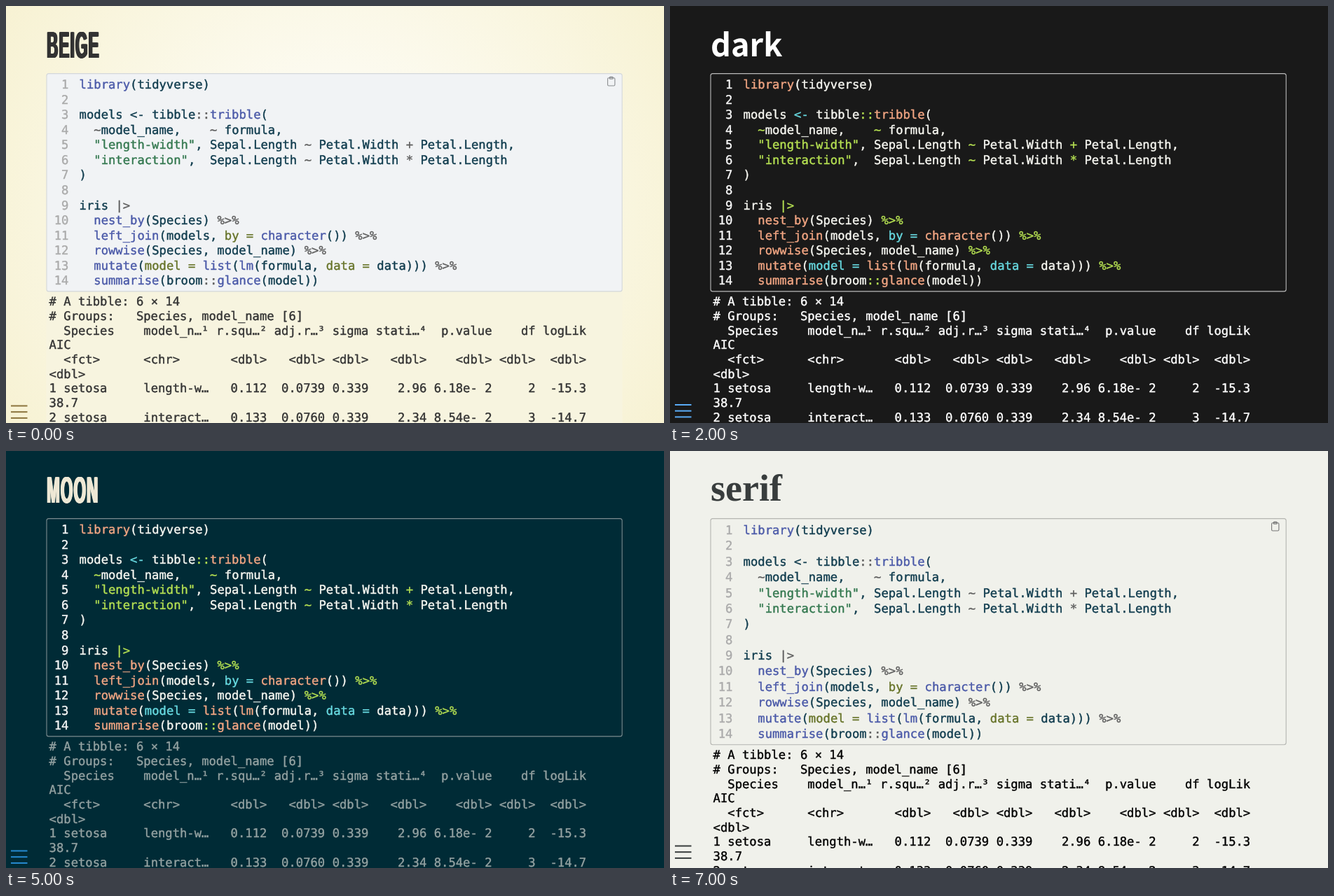
An HTML page with a canvas for the animation above (8000 ms loop, 939 by 596 pixels).

```html
<!DOCTYPE html>
<html lang="en">
<head>
<meta charset="utf-8">
<title>Slide themes</title>
<style>
  html, body { margin: 0; width: 100%; height: 100%; overflow: hidden; }
  canvas { display: block; width: 939px; height: 596px; }
</style>
</head>
<body>
<canvas id="stage" width="939" height="596"></canvas>
<script>
const WIDTH = 939, HEIGHT = 596, HOLD = 1000;
const ctx = document.getElementById('stage').getContext('2d');

const MONO = '17.2px "DejaVu Sans Mono", monospace';
const SANS = 'bold 45px "Noto Sans CJK JP", "Noto Sans CJK SC", "Open Sans", sans-serif';
const GOTHIC = 'bold 53px "Liberation Sans", Arial, sans-serif';
const COLUMN = 10.36;

const CODE = `library(tidyverse)

models <- tibble::tribble(
  ~model_name,    ~ formula,
  "length-width", Sepal.Length ~ Petal.Width + Petal.Length,
  "interaction",  Sepal.Length ~ Petal.Width * Petal.Length
)

iris |>
  nest_by(Species) %>%
  left_join(models, by = character()) %>%
  rowwise(Species, model_name) %>%
  mutate(model = list(lm(formula, data = data))) %>%
  summarise(broom::glance(model))`.split('\n');

const OUTPUT = `# A tibble: 6 × 14
# Groups:   Species, model_name [6]
  Species    model_n…¹ r.squ…² adj.r…³ sigma stati…⁴  p.value    df logLik
AIC
  <fct>      <chr>       <dbl>   <dbl> <dbl>   <dbl>    <dbl> <dbl>  <dbl>
<dbl>
1 setosa     length-w…   0.112  0.0739 0.339    2.96 6.18e- 2     2  -15.3
38.7
2 setosa     interact…   0.133  0.0760 0.339    2.34 8.54e- 2     3  -14.7`.split('\n');

const LIGHT = {
  number: '#aaaaaa', plain: '#103c4e', string: '#33784f', call: '#4a59a8',
  argument: '#667328', assign: '#103c4e', operator: '#5e5e5e'
};
const DARK = {
  number: '#f8f8f8', plain: '#f8f8f2', string: '#b6e152', call: '#f3a683',
  argument: '#68dbe2', assign: '#68dbe2', operator: '#b6e152'
};

const THEMES = [
  { title: 'BEIGE', font: GOTHIC, condensed: true, baseline: 74, heading: '#333333',
    glow: ['#ffffff', '#f7f2d3'], syntax: LIGHT, box: '#f1f3f5', border: '#d3d7da',
    panel: '#f7f4df', text: '#333333', menu: '#8b743d', icon: '#8a8d90' },
  { title: 'BLOOD', font: 'bold 50px "Open Sans", sans-serif', baseline: 72, heading: '#eeeeee',
    back: '#222222', syntax: DARK, border: '#bbbbbb', text: '#eeeeee',
    menu: '#aa2233', menuY: 570 },
  { title: 'dark', font: SANS, baseline: 72, heading: '#ffffff',
    back: '#191919', syntax: DARK, border: '#bbbbbb', text: '#ffffff',
    menu: '#5aabf5', menuY: 570 },
  { title: 'default', font: SANS, baseline: 72, heading: '#222222',
    back: '#ffffff', syntax: LIGHT, border: '#cccccc', text: '#222222',
    menu: '#3d75d6', menuY: 570, icon: '#8a8a8a' },
  { title: 'LEAGUE', font: GOTHIC, condensed: true, baseline: 74, heading: '#ffffff',
    glow: ['#555a5f', '#1c1e20'], syntax: DARK, border: '#e0e0e0',
    panel: '#000000', text: '#ffffff', menu: '#4fc6dc' },
  { title: 'MOON', font: GOTHIC, condensed: true, baseline: 74, heading: '#eee8d5',
    back: '#002b36', syntax: DARK, border: '#7c8c8f', text: '#93a1a1', menu: '#268bd2' },
  { title: 'night', font: 'bold 53px Inter, sans-serif', baseline: 74, heading: '#ffffff',
    back: '#111111', syntax: DARK, border: '#777777', text: '#ffffff',
    menu: '#dfa75c', icon: '#cccccc' },
  { title: 'serif', font: 'bold 54px "Liberation Serif", Times, serif', baseline: 71,
    heading: '#383d3d', back: '#f0f1eb', syntax: LIGHT, border: '#b4b5b1', text: '#000000',
    menu: '#383d3d', menuY: 564.5, icon: '#777777', pitch: 22.38, codeY: 119, boxBottom: 419.8 }
];

const TOKEN = /(?<string>"[^"]*")|(?<call>\w+(?=\())|(?<argument>(?:by|model|data) =)|(?<assign><-)|(?<operator>%>%|\|>|::|[~+*])/g;

function tokenize(line) {
  const tokens = [];
  let end = 0;
  const add = (text, kind, column) => text && tokens.push({ text, kind, column });
  for (const match of line.matchAll(TOKEN)) {
    add(line.slice(end, match.index), 'plain', end);
    add(match[0], Object.keys(match.groups).find(k => match.groups[k]), match.index);
    end = match.index + match[0].length;
  }
  add(line.slice(end), 'plain', end);
  return tokens;
}
const CODE_TOKENS = CODE.map(tokenize);

function write(text, x, y, color) {
  ctx.fillStyle = color;
  ctx.fillText(text, x, y);
}

// Monospaced text with slightly heavier strokes.
function writeMono(text, x, y, color) {
  ctx.font = MONO;
  ctx.lineWidth = 0.4;
  ctx.strokeStyle = color;
  ctx.strokeText(text, x, y);
  write(text, x, y, color);
}

function drawBackground({ back, glow }) {
  if (glow) {
    const cx = WIDTH / 2, cy = HEIGHT / 2;
    back = ctx.createRadialGradient(cx, cy, 0, cx, cy, Math.hypot(cx, cy));
    glow.forEach((color, i) => back.addColorStop(i, color));
  }
  ctx.fillStyle = back;
  ctx.fillRect(0, 0, WIDTH, HEIGHT);
}

function drawTitle({ title, font, condensed, baseline, heading }) {
  ctx.save();
  ctx.font = font;
  ctx.translate(58, baseline);
  if (condensed) {
    // Narrow, heavy gothic: overlapping copies thicken the stems.
    ctx.scale(0.42, 1);
    ctx.letterSpacing = '3px';
    for (let dx = -2; dx <= 3; dx++) write(title, dx, 0, heading);
  } else {
    write(title, 0, 0, heading);
  }
  ctx.restore();
}

function drawClipboard(color) {
  ctx.strokeStyle = color;
  ctx.lineWidth = 1.1;
  ctx.beginPath();
  ctx.roundRect(858.6, 102.8, 10.3, 11.2, 1.5);
  ctx.roundRect(861.2, 101.4, 5.1, 2.8, 1);
  ctx.stroke();
}

function drawCode({ syntax, box, border, icon, pitch = 21.54, codeY = 118.2, boxBottom = 407.9 }) {
  ctx.beginPath();
  ctx.roundRect(58, 96.6, 821.2, boxBottom - 96.6, 3);
  if (box) {
    ctx.fillStyle = box;
    ctx.fill();
  }
  ctx.strokeStyle = border;
  ctx.lineWidth = 1.1;
  ctx.stroke();
  if (icon) drawClipboard(icon);

  CODE_TOKENS.forEach((tokens, i) => {
    const y = codeY + i * pitch;
    const number = String(i + 1);
    writeMono(number, 89.4 - number.length * COLUMN, y, syntax.number);
    for (const { text, kind, column } of tokens) {
      writeMono(text, 104.6 + column * COLUMN, y, syntax[kind]);
    }
  });
}

function drawOutput({ panel, text, boxBottom = 407.9 }) {
  if (panel) {
    ctx.fillStyle = panel;
    ctx.fillRect(57.5, boxBottom, 822, HEIGHT);
  }
  OUTPUT.forEach((line, i) => {
    for (const word of line.matchAll(/\S+/g)) {
      writeMono(word[0], 61.6 + word.index * COLUMN, boxBottom + 20.4 + i * 20.68, text);
    }
  });
}

function drawMenu({ menu, menuY = 571.5 }) {
  ctx.fillStyle = menu;
  for (let i = 0; i < 3; i++) ctx.fillRect(7, menuY - 1 + i * 8.7, 23.5, 2);
}

function draw(theme) {
  ctx.textRendering = 'geometricPrecision';
  ctx.lineJoin = 'round';
  drawBackground(theme);
  drawTitle(theme);
  drawOutput(theme);
  drawCode(theme);
  drawMenu(theme);
}

function tick() {
  draw(THEMES[Math.floor(performance.now() / HOLD) % THEMES.length]);
  requestAnimationFrame(tick);
}
tick();
</script>
</body>
</html>
```
